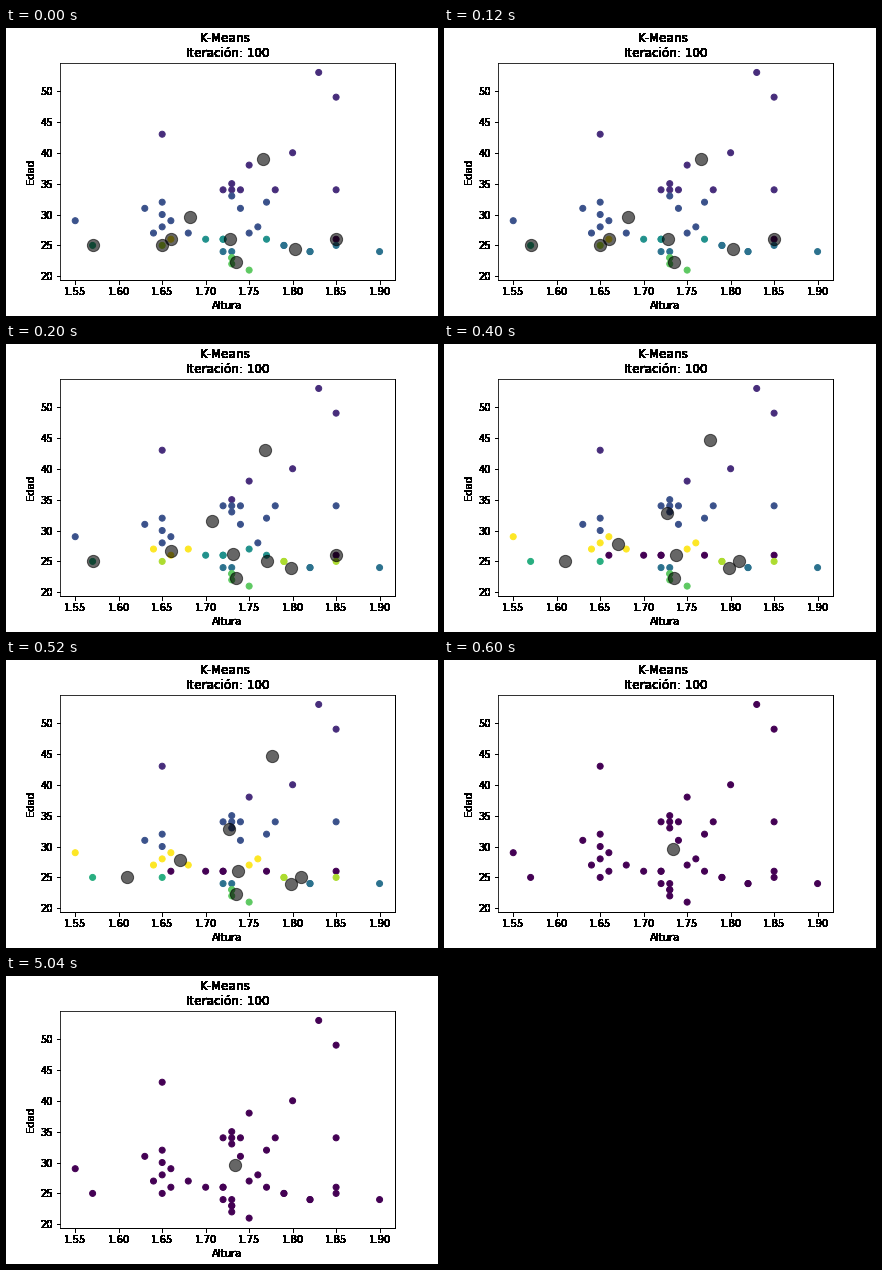
These frames come from a looping animation (432x288 px, 8000 ms). A matplotlib script:

```python
import numpy as np
import matplotlib.pyplot as plt
from matplotlib.animation import FuncAnimation

plt.rcParams["font.family"] = "DejaVu Sans"

DPI = 72
STEP_MS = 200
LOOP_MS = 8000
STEPS = 4
OVERDRAW = 40

# Heights in cm of the people of each age, oldest first.
AGES = [53, 49, 43, 40, 38, *range(35, 20, -1)]
HEIGHTS = [
    [183], [185], [165], [180], [175], [173], [172, 173, 174, 178, 185],
    [173], [165, 177], [163, 174], [165], [155, 166], [165, 176],
    [164, 168, 175], [166, 170, 172, 172, 177, 185],
    [157, 165, 179, 179, 185], [172, 173, 182, 182, 190],
    [173, 173], [173], [175],
]
SEEDS = [29, 3, 22, 32, 26, 30, 42, 31, 24]  # points the clusters start from

people = np.array([(h, age) for age, row in zip(AGES, HEIGHTS) for h in row],
                  dtype=float)
METRES = np.array([0.01, 1])


def center(members):
    return members.mean(axis=0) if len(members) else np.full(2, np.nan)


def k_means(centers):
    """Yield labels and centers per step; an empty cluster's NaN takes all."""
    for _ in range(STEPS):
        gap = (people[:, None] - centers) * METRES
        own = np.argmin((gap ** 2).sum(axis=2), axis=1)
        centers = np.array([center(people[own == k])
                            for k in range(len(centers))])
        yield own, centers[np.unique(own)] * METRES


steps = list(k_means(people[SEEDS]))
points = people * METRES


def overdraw(artist):
    """Paint an artist repeatedly so its soft edges turn solid."""
    draw = artist.draw

    def draw_many(renderer):
        for _ in range(OVERDRAW):
            draw(renderer)

    artist.draw = draw_many


fig, ax = plt.subplots(figsize=(432 / DPI, 288 / DPI), dpi=DPI,
                       facecolor="white")
fig.subplots_adjust(left=0.125, right=0.9, bottom=0.125, top=0.88)

dots = ax.scatter(*points.T, c=steps[0][0], cmap="viridis")
means = ax.scatter([], [], c="black", s=150, alpha=0.6)

# Data range plus a 5 % margin on each side.
low, high = points.min(axis=0), points.max(axis=0)
margin = 0.05 * (high - low)
ax.set_xlim(low[0] - margin[0], high[0] + margin[0])
ax.set_ylim(low[1] - margin[1], high[1] + margin[1])
ax.set_xticks(np.linspace(1.55, 1.90, 8))
ax.set_yticks(range(20, 51, 5))
ax.set_xlabel("Altura")
ax.set_ylabel("Edad")
ax.set_title("K-Means \nIteración: 100")

for part in (ax.title, ax.xaxis.label, ax.yaxis.label,
             ax.spines["bottom"], ax.spines["right"]):
    overdraw(part)
for axis in (ax.xaxis, ax.yaxis):
    for tick in axis.get_major_ticks():
        overdraw(tick.label1)
        overdraw(tick.tick1line)


def update(frame):
    own, centers = steps[min(frame, STEPS - 1)]
    dots.set_array(own)
    dots.set_clim(own.min(), own.max())
    means.set_offsets(centers)
    return dots, means


anim = FuncAnimation(fig, update, frames=LOOP_MS // STEP_MS,
                     interval=STEP_MS, repeat=True, repeat_delay=0)
plt.show()
```
